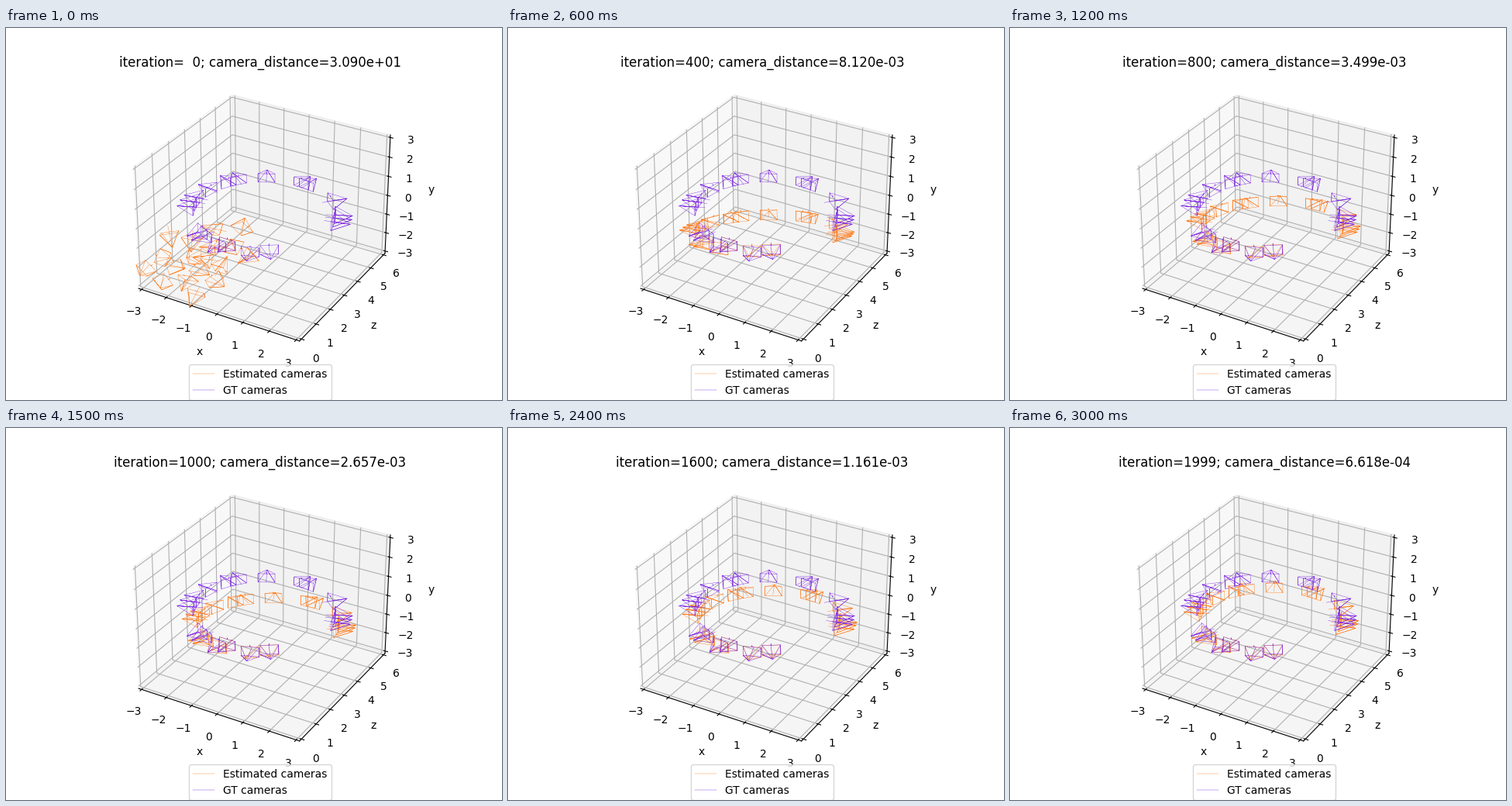
Animation of 640x480 px, one loop 3300 ms. Source, as a matplotlib script:

```python
import numpy as np
import matplotlib.pyplot as plt
from matplotlib.animation import FuncAnimation

ORANGE, PURPLE = "#FF7D1E", "#812CE5"
STEPS = 11

# Places of the cameras around the ring, in degrees as seen on screen
RING = [-148, -142, -125, -100, -86, -16, -10, -5, 18,
        52, 57, 88, 112, 121, 140, 157, 164, 172]


def wireframe(scale=0.3):
    """Camera outline as (right, forward, up) points."""
    a, b, c, d = (-1, 2, .75), (1, 2, .75), (-1, 2, -.75), (1, 2, -.75)
    up1, up2, eye, front = (0, 2, .75), (0, 2, 1), (0, 0, 0), (0, 3, 0)
    path = [a, up1, up2, up1, b, d, c, a, eye, b, d, eye, c, eye, front]
    return scale * np.array(path, float)


def turn(pitch, roll, yaw):
    cp, sp = np.cos(pitch), np.sin(pitch)
    cr, sr = np.cos(roll), np.sin(roll)
    cy, sy = np.cos(yaw), np.sin(yaw)
    rx = np.array([[1, 0, 0], [0, cp, sp], [0, -sp, cp]])
    ry = np.array([[cr, 0, -sr], [0, 1, 0], [sr, 0, cr]])
    rz = np.array([[cy, sy, 0], [-sy, cy, 0], [0, 0, 1]])
    return rx @ ry @ rz


WIRE = wireframe()


def ring_camera(angle):
    """Camera facing the middle of a ring that bulges slightly at the front."""
    phi = np.radians(angle + 30)
    radius = 3 + 0.3 * np.exp(-((angle + 112) / 20) ** 2)
    place = [radius * np.cos(phi), 3 + radius * np.sin(phi), 0]
    return WIRE @ turn(0, 0, -phi - np.pi / 2).T + place


def scattered_cameras(count):
    """Randomly turned cameras spread along a sheared golden spiral."""
    rng = np.random.default_rng(4)
    wires = []
    for i in range(count):
        r, angle = ((i + 0.5) / count) ** 0.7, 2.4 * i
        p, q = r * np.cos(angle), r * np.sin(angle)
        place = [-0.7 + 2.3 * p, 0, -0.7 + 1.6 * p + 2.1 * q]
        wires.append((WIRE - [0, 0.4, 0]) @ turn(*rng.normal(0, 0.8, 3)).T + place)
    return wires


def iteration(step):
    return min(200 * step, 1999)


def distance(step):
    """Error decays exponentially between a few known values."""
    known = [0, 200, 400, 800, 1200, 1600, 1999]
    values = [30.90, 5.466e-2, 8.120e-3, 3.499e-3, 2.017e-3, 1.161e-3, 6.618e-4]
    return np.exp(np.interp(iteration(step), known, np.log(values)))


TRUE = [ring_camera(a) for a in RING]
START = scattered_cameras(len(RING))


def estimate(step):
    """The true ring, leaning further the larger the error is."""
    if step == 0:
        return START
    error = np.sqrt(distance(step) / distance(4))
    pitch, roll, yaw, shift = [
        np.interp(error, [0, 1, 1.5, 4], values) for values in (
            [0, .19, .31, .45], [0, .15, .20, .375],
            [0, .067, .03, -.08], [0, 0, 0, -.2])]
    r = turn(pitch, roll, yaw)
    return [w @ r.T + [shift, 0, 0] for w in TRUE]


fig = plt.figure(figsize=(6.4, 4.8), dpi=100)
ax = fig.add_subplot(projection="3d")


def draw(wires, color):
    return [ax.plot(*w.T, color=color, linewidth=0.3)[0] for w in wires]


# The first camera is held fixed at the origin in both sets
fixed = draw([WIRE], ORANGE)
moving = draw(START, ORANGE)
truth = draw([WIRE] + TRUE, PURPLE)

span = (-3.125, 3.125)
ax.set(xlim=span, ylim=(-0.125, 6.125), zlim=span,
       xticks=range(-3, 4), yticks=range(7), zticks=range(-3, 4),
       xlabel="x", ylabel="z", zlabel="y")
ax.legend([fixed[0], truth[0]], ["Estimated cameras", "GT cameras"],
          loc="upper center", bbox_to_anchor=(0.5, 0))


def update(step):
    for line, wire in zip(moving, estimate(step)):
        line.set_data_3d(*wire.T)
    ax.set_title(f"iteration={iteration(step):3d}; "
                 f"camera_distance={distance(step):.3e}")
    return moving


anim = FuncAnimation(fig, update, frames=STEPS, interval=300, repeat=True)
plt.show()
```
